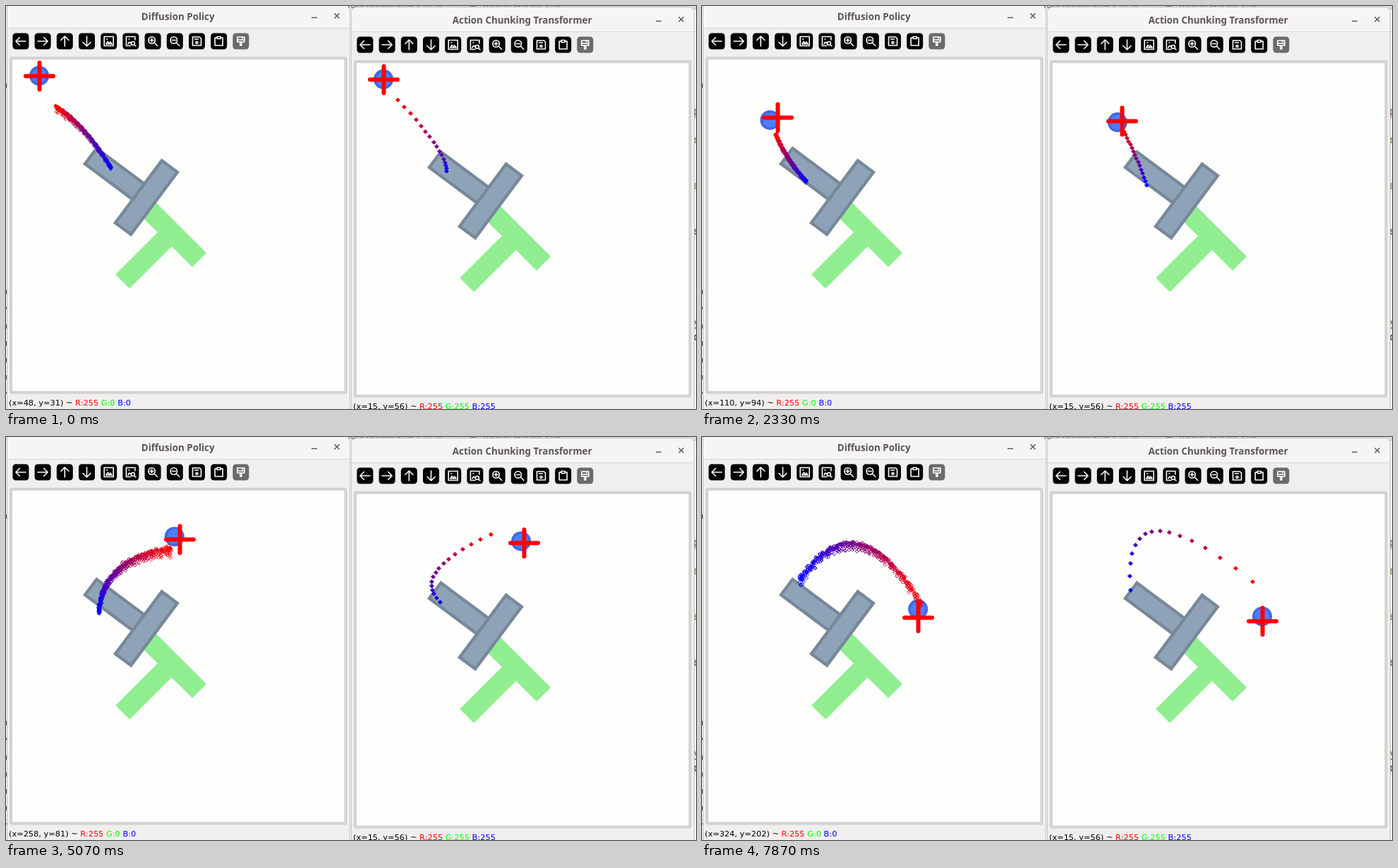
Recreate the animation shown at these times as an HTML page with a canvas. Size 978 by 572 pixels, loop 8000 ms.

```html
<!DOCTYPE html>
<html lang="en">
<head>
<meta charset="utf-8">
<title>Policy comparison</title>
<style>
  html, body { margin: 0; width: 100%; height: 100%; overflow: hidden; background: #fdfdfc; }
  svg, canvas { position: absolute; left: 0; top: 0; width: 978px; height: 572px; }
  .title { font: bold 13.4px "Noto Sans", "Open Sans", sans-serif; fill: #5b5855; text-anchor: middle; }
  .status { font: 11.35px "DejaVu Sans", sans-serif; white-space: pre; }
  .code { font: 16px "Noto Sans Mono", "DejaVu Sans Mono", monospace; }
  .tab { font: 13px "Noto Sans", "Open Sans", sans-serif; fill: #6b6258; }
  .icon { fill: none; stroke: #fff; stroke-width: 1.6; stroke-linecap: round; stroke-linejoin: round; }
  .block rect { fill: #8fa3b8; stroke: #778899; stroke-width: 4.8; }
  .goal rect { fill: #90ee90; stroke: #90ee90; }
</style>
</head>
<body>
<svg id="desk" viewBox="0 0 978 572"></svg>
<canvas id="stage" width="978" height="572"></canvas>
<script>
const LOOP = 8000, DX = 488, DY = 5, SCALE = 0.918;

// ---- static windows ----
const ARROW = 'M7 0H-7M-1.5-5.5L-7 0L-1.5 5.5';
const MAG = 'M2 2L6.5 6.5M3.2-1.5A4.7 4.7 0 1 1-6.2-1.5A4.7 4.7 0 1 1 3.2-1.5';
const ICONS = [
  [ARROW, 0], [ARROW, 180], [ARROW, 90], [ARROW, 270],
  ['M-6.5-6.5H6.5V6.5H-6.5ZM-4 4L-1.5 .5L.5 3L2 1L4.5 4ZM-3-3H-2', 0],
  ['M6-2V-6.5H-6.5V6.5H0M-4 4L-2 1L0 3M-3-3H-2M7 7L5 5M5.5 3A2.5 2.5 0 1 1 .5 3A2.5 2.5 0 1 1 5.5 3', 0],
  [MAG + 'M-4-1.5H1M-1.5-4V1', 0],
  [MAG + 'M-4-1.5H1', 0],
  ['M-6-6H4L6-4V6H-6ZM-3-3H2M1.5 2A1.5 1.5 0 1 1-1.5 2A1.5 1.5 0 1 1 1.5 2', 0],
  ['M-2.5-5H-5.5V6H5.5V-5H2.5M-2.5-6.5H2.5V-3.5H-2.5Z', 0],
  ['M-5-6H5V1H-5ZM-5-2H5M-1 1V6H1V1M2-6V-4', 0],
];

const icon = ([d, turn], i) => `
  <g transform="translate(${20.9 + 31.2 * i} 50)">
    <rect x="-11.5" y="-11.5" width="23" height="23" rx="4.5" fill="${i === 10 ? '#6b6b6b' : '#000'}"/>
    <path class="icon" d="${d}" transform="rotate(${turn})"/>
  </g>`;

const tee = (kind, x, y, turn) => `
  <g class="${kind}" transform="translate(${x} ${y}) rotate(${turn}) scale(${SCALE})">
    <rect x="-15" y="30" width="30" height="92"/>
    <rect x="-60" width="120" height="30"/>
  </g>`;

const status = (x, y, r, g, b) =>
  `(x=${x}, y=${y}) ~ <tspan fill="#f00">R:${r}</tspan> ` +
  `<tspan fill="#0f0">G:${g}</tspan> <tspan fill="#00f">B:${b}</tspan>`;

const win = (id, title, x, y) => `
  <g transform="translate(${x} ${y})">
    <rect x="1" y="-4" width="487" height="600" rx="9" fill="#c3c0bc"/>
    <rect x="2" y="-3" width="485" height="600" rx="8" fill="#f0efee"/>
    <path d="M2 31V5Q2-3 10-3H479Q487-3 487 5V31Z" fill="#f6f5f4"/>
    <path d="M2 31.5H487" stroke="#dbd8d4"/>
    <text class="title" x="243.7" y="19.6">${title}</text>
    <path d="M433 16.5H441M465.5 10.5L472.5 17.5M472.5 10.5L465.5 17.5" stroke="#5f5c59" stroke-width="1.5"/>
    ${ICONS.map(icon).join('')}
    <rect x="7" y="74" width="474.5" height="474.5" rx="1" fill="#fefefc" stroke="#d2d2d0" stroke-width="4"/>
    ${tee('goal', 244.6, 311.6, 45)}
    ${tee('block', 210, 280, 126.7)}
    <text class="status" id="${id}" x="4" y="567">${status(15, 56, 255, 255, 255)}</text>
  </g>`;

const glyph = ([ch, y, fill]) => `<text class="code" x="974" y="${y}" fill="${fill}">${ch}</text>`;
const code = [['p', 155, '#7b2a80'], ['e', 195, '#5a8a1e'], ['e', 260, '#5a8a1e'],
  ['e', 325, '#4a3a90'], ['y', 454, '#6b5a20'], ['c', 475, '#30307a']];

document.getElementById('desk').innerHTML = `
  <rect width="978" height="572" fill="#fdfdfc"/>
  <rect width="978" height="6" fill="#e4e1dd"/>
  <rect x="831" width="147" height="6" fill="#d9d5d1"/>
  ${code.map(glyph).join('')}
  <path d="M.5 110V131M.5 403V430M.5 452V550" stroke="#555" stroke-dasharray="6 18"/>
  ${win('probe', 'Diffusion Policy', 0, 0)}
  <rect x="487" width="491" height="3" fill="#e0ddd9"/>
  <text class="tab" x="484" y="3">functionality by 2, 0 &#160;×</text>
  <path d="M638.5 0V3" stroke="#aaa6a2"/>
  <circle cx="662" cy="-1" r="4" fill="#4b8bbe"/>
  <text class="tab" x="676" y="3">tuning whistles by</text>
  ${win('still', 'Action Chunking Transformer', DX, DY)}`;

// ---- motion: the simulation advances in even steps, with one stall ----
const PACE = 172, STALL = 570, STALL_END = 7176;

function stepAt(t) {
  const sim = t < STALL_END ? Math.min(t, STALL_END - STALL - 1) : t - STALL;
  return Math.floor((sim - 70) / PACE) + 1;
}

// Smooth tracks through a few [step, x, y] points, in window coordinates.
const CROSS = [[0, 47, 99], [10, 69, 167], [18, 151, 138], [23, 187, 130],
  [30, 246, 145], [38, 304, 194], [43, 306, 256]];

// Each predicted path bends from a near point over a middle one to a far one.
const DIFFUSION = {
  near: [[0, 72, 143], [10, 91, 187], [18, 126, 171], [30, 232, 158], [38, 297, 181], [43, 309, 234]],
  mid: [[0, 111, 177], [10, 124, 207], [18, 123, 218], [30, 160, 186], [43, 222, 152]],
  far: [[0, 148, 228], [10, 153, 238], [23, 131, 262], [43, 140, 199]],
};
const CHUNKING = {
  near: [[0, 67, 128], [10, 104, 183], [18, 115, 151], [23, 136, 125], [30, 199, 133], [43, 292, 200]],
  mid: [[0, 120, 191], [10, 131, 212], [23, 114, 191], [38, 140, 170], [43, 155, 128]],
  far: [[0, 136, 229], [10, 145, 250], [23, 132, 237], [43, 119, 212]],
};

const ctx = document.getElementById('stage').getContext('2d');
const probe = document.getElementById('probe');
const mix = (a, b, u) => a + (b - a) * u;
const clamp = (v, lo, hi) => Math.max(lo, Math.min(hi, v));

// Cubic Hermite between neighbouring key points
function locate(track, step) {
  const last = track.length - 1;
  const s = clamp(step, 0, track[last][0]);
  let i = 0;
  while (i < last - 1 && s >= track[i + 1][0]) i++;
  const a = track[i], b = track[i + 1], span = b[0] - a[0], u = (s - a[0]) / span;
  const slope = (k, c) => {
    const p = track[Math.max(k - 1, 0)], q = track[Math.min(k + 1, last)];
    return (q[c] - p[c]) / (q[0] - p[0]) * span;
  };
  return [1, 2].map(c => mix(a[c], b[c], u * u * (3 - 2 * u)) +
    u * (1 - u) * ((1 - u) * slope(i, c) - u * slope(i + 1, c)));
}

// Parabola through the near, middle and far point; u in 0..1
function bend({ near, mid, far }, step) {
  const a = locate(near, step), b = locate(mid, step), c = locate(far, step);
  return u => [0, 1].map(k => (1 - u) * (1 - 2 * u) * a[k] + 4 * u * (1 - u) * b[k] + u * (2 * u - 1) * c[k]);
}

function random(seed) {
  return () => {
    seed = seed + 0x6D2B79F5 | 0;
    let r = Math.imul(seed ^ seed >>> 15, 1 | seed);
    r = r + Math.imul(r ^ r >>> 7, 61 | r) ^ r;
    return ((r ^ r >>> 14) >>> 0) / 4294967296;
  };
}

function diamond(x, y, r, u, solid) {
  x = Math.round(x) + .5;
  y = Math.round(y) + .5;
  ctx.beginPath();
  ctx.moveTo(x, y - r);
  ctx.lineTo(x + r, y);
  ctx.lineTo(x, y + r);
  ctx.lineTo(x - r, y);
  ctx.closePath();
  ctx.lineWidth = 1;
  ctx.strokeStyle = ctx.fillStyle = `rgb(${Math.round(255 * (1 - u))},0,${Math.round(255 * u)})`;
  ctx.stroke();
  if (solid) ctx.fill();
}

function disc([x, y], r, fill) {
  ctx.fillStyle = fill;
  ctx.beginPath();
  ctx.arc(x, y, r, 0, 7);
  ctx.fill();
}

// The ball trails the cross by a fraction of a step.
function agent(step, lag) {
  const ball = locate(CROSS, step - lag);
  const [x, y] = locate(CROSS, step).map(v => Math.round(v) + .5);
  disc(ball, 14, '#4169e1');
  disc(ball, 10.4, '#4e7eff');
  ctx.strokeStyle = '#f00';
  ctx.lineWidth = 6;
  ctx.lineCap = 'round';
  ctx.beginPath();
  ctx.moveTo(x - 19.5, y);
  ctx.lineTo(x + 19.5, y);
  ctx.moveTo(x, y - 19);
  ctx.lineTo(x, y + 19);
  ctx.stroke();
}

// Many noisy rollouts: a dense core, with a few strays sagging below it
function cloud(path, step) {
  const rnd = random(step * 7919 + 5);
  const bell = () => rnd() + rnd() + rnd() - 1.5;
  const near = 2.5 + 1.7 * Math.cos((step - 33) * Math.PI / 22);
  const far = 1 + 3 * (step / 43) ** 4;
  const slide = clamp((near + far) / 2 - .9, 0, 1.2);
  for (let s = 0; s < 30; s++) {
    const ox = bell(), oy = bell(), sag = 3.5 * rnd() ** 6, shift = bell() * slide;
    for (let k = 15; k >= 0; k--) {
      const u = clamp((k + shift) / 15, 0, 1), w = mix(near, far, u);
      const [x, y] = path(u);
      diamond(x + (ox + bell()) * w * .55, y + ((oy + bell()) * .55 + sag) * w, 2.2, k / 15);
    }
  }
}

function dots(path) {
  for (let k = 15; k >= 0; k--) diamond(...path(k / 15), 2.8, k / 15, true);
}

function draw(step) {
  ctx.clearRect(0, 0, 978, 572);
  agent(step, .9);
  cloud(bend(DIFFUSION, step), step);
  ctx.save();
  ctx.translate(DX, DY);
  agent(step, .5);
  dots(bend(CHUNKING, step));
  ctx.restore();

  const [x, y] = locate(CROSS, step);
  const lead = Math.max(0, 7 - step * .25);
  probe.innerHTML = status(Math.round((x - 9) / SCALE + lead), Math.round((y - 76) / SCALE + 5.5), 255, 0, 0);
}

let shown = -1;
function tick() {
  const step = stepAt(performance.now() % LOOP);
  if (step !== shown) draw(shown = step);
  requestAnimationFrame(tick);
}
tick();
</script>
</body>
</html>
```
